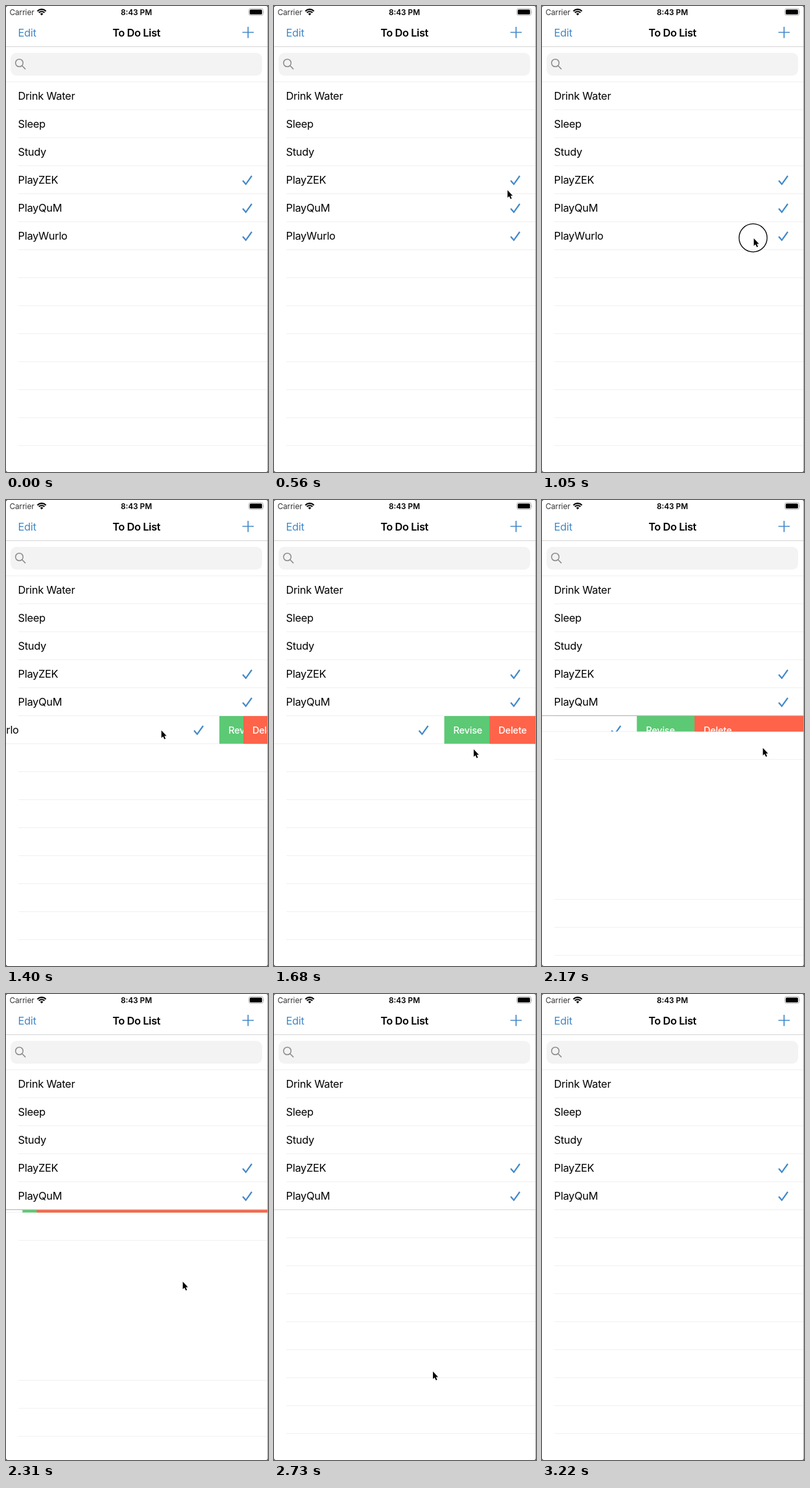
Animation of 404 by 716 pixels, one loop 3290 ms. Source, as an HTML page:

```html
<!DOCTYPE html>
<html lang="en">
<head>
<meta charset="utf-8">
<title>To Do List</title>
<style>
  html, body { margin: 0; width: 100%; height: 100%; overflow: hidden; background: #fff; }
  svg { display: block; font-family: Inter, "Liberation Sans", sans-serif; }
  #stage { width: 404px; height: 716px; }
  .body { font-size: 16.4px; letter-spacing: -.28px; }
  .title { font-size: 16.4px; font-weight: 600; letter-spacing: -.42px; text-anchor: middle; }
  .small { font-size: 11.8px; letter-spacing: -.08px; }
  .clock { font-size: 11.8px; font-weight: 600; text-anchor: middle; }
  .button { font-size: 14.6px; font-weight: 500; letter-spacing: -.25px; fill: #fff; }
  .blue { fill: #4389c8; }
  .tint { fill: none; stroke: #4389c8; }
  .line { stroke: #f0f0f0; }
</style>
</head>
<body>
<svg id="stage" viewBox="0 0 404 716">
  <rect width="404" height="716" fill="#fff"/>

  <text class="small" x="5.5" y="14" fill="#333">Carrier</text>
  <g fill="none" stroke="#000" stroke-width="2.1">
    <path d="M48.4 7.9A9.3 9.3 0 0 1 61.6 7.9"/>
    <path d="M50.7 10.2A6.1 6.1 0 0 1 59.3 10.2"/>
    <path d="M52.6 12.1A3.4 3.4 0 0 1 57.4 12.1L55 14.5Z" fill="#000" stroke="none"/>
  </g>
  <text class="clock" x="201" y="14">8:43 PM</text>
  <rect x="374.5" y="4" width="22" height="10.5" rx="2.8" fill="none" stroke="#b0b0b0"/>
  <rect x="375.8" y="5.4" width="19" height="7.7" rx="1.6"/>
  <path d="M397.5 8Q399 9.5 397.5 11Z" fill="#b0b0b0"/>

  <text class="body blue" x="18.5" y="46.5">Edit</text>
  <text class="title" x="201" y="46.5">To Do List</text>
  <path class="tint" d="M364.5 40.5H382M373.3 32V49.3" stroke-width="1.7"/>
  <path d="M0 62.5H404" stroke="#d4d4d4"/>

  <rect x="7" y="72" width="388" height="35" rx="9" fill="#f3f3f3"/>
  <g fill="none" stroke="#8b8b8f" stroke-width="1.5">
    <circle cx="20.5" cy="87.5" r="5.8"/>
    <path d="M24.8 91.8L29.6 96.6" stroke-linecap="round"/>
  </g>
  <path class="line" d="M0 116.5H404"/>

  <g id="rows"></g>
  <g id="blanks"></g>
  <path id="edge" class="line"/>

  <svg id="swipe" y="332" width="404" height="42.5" overflow="hidden">
    <g id="cell"></g>
    <rect id="green" width="404" height="43" fill="#5cc975"/>
    <text id="revise" class="button" y="26.8">Revise</text>
    <rect id="red" width="404" height="43" fill="#ff644a"/>
    <text id="delete" class="button" y="26.8">Delete</text>
  </svg>
  <path id="seam" d="M0 331.3H404" stroke="#b9a5a5"/>

  <path d="M403.5 0V716" stroke="#a8a8a8"/>
  <path d="M0 0H3Q0 0 0 3ZM404 0V3Q404 0 401 0ZM0 716V713Q0 716 3 716ZM404 716H401Q404 716 404 713Z" fill="#333"/>

  <g id="pointer">
    <circle id="touch" cx="-.5" cy=".3" r="21.6" fill="none" stroke="#000" stroke-width="1.3"/>
    <path d="M.6 1V12.6L3.2 10.2L5.2 14.6L7.1 13.7L5.2 9.4H8.6Z" stroke="#fff" stroke-width="1.4" paint-order="stroke"/>
  </g>
</svg>
<script>
const LOOP = 3290, STEP = 70, ROW = 43, TOP = 117, WIDTH = 404;
const SLOT = TOP + 5 * ROW;
const OPEN = 144, RED_WIDTH = 73;

// time, x, y of the pointer tip
const track = [
  [70, 215, 544], [140, 290, 430], [210, 337, 330], [280, 337, 330],
  [490, 350, 274], [630, 369, 290], [840, 331, 357], [1050, 326, 356],
  [1120, 314, 356], [1190, 294, 355], [1260, 271, 354], [1330, 251, 353],
  [1400, 239, 353], [1540, 262, 380], [1750, 330, 383], [1960, 359.5, 361],
  [2100, 359.5, 361], [2170, 340, 380], [2310, 272, 441], [2520, 268, 445],
  [2590, 258, 540], [2730, 244.5, 579], [3080, 208, 690], [3150, 196, 712]
];

const el = id => document.getElementById(id);
const set = (id, attrs) => {
  for (const name in attrs) el(id).setAttribute(name, attrs[name]);
};
const show = (id, on) => set(id, { visibility: on ? "visible" : "hidden" });
const ramp = (t, start, length) => Math.min(1, Math.max(0, (t - start) / length));
const easeOut = (u, power) => 1 - (1 - u) ** power;
const rule = (y, x = 19) => `<path class="line" d="M${x} ${y}H404"/>`;

function rowMarkup(label, done) {
  const tick = `<path class="tint" stroke-width="2.2" d="M365 22.3L369.8 27.8L379 15"/>`;
  return `<text class="body" x="18.5" y="27.4">${label}</text>${done ? tick : ""}`;
}

el("rows").innerHTML = ["Drink Water", "Sleep", "Study", "PlayZEK", "PlayQuM"]
  .map((label, i) => `<g transform="translate(0 ${TOP + i * ROW})">` +
    rowMarkup(label, i > 2) + rule(ROW - .5) + "</g>").join("");
el("cell").innerHTML = rowMarkup("PlayWurlo", true);
el("blanks").innerHTML = Array.from({ length: 8 }, (_, k) =>
  rule(SLOT + (k + 2) * ROW - .5)).join("");

function pointerAt(t) {
  const i = track.findIndex(key => key[0] >= t);
  if (i < 0 || t < track[0][0]) return null;
  const b = track[i], a = track[Math.max(0, i - 1)];
  const u = b === a ? 0 : (t - a[0]) / (b[0] - a[0]);
  return [a[1] + (b[1] - a[1]) * u, a[2] + (b[2] - a[2]) * u];
}

function swipeAt(t, pointer) {
  if (t < 1050) return 0;
  if (t <= 1400) return Math.max(0, 326 - pointer[0] - 12);
  return 75 + (OPEN - 75) * easeOut(ramp(t, 1400, 420), 3);
}

function draw(t) {
  const pointer = pointerAt(t);
  show("pointer", pointer);
  if (pointer) set("pointer", { transform: `translate(${pointer})` });
  const touching = t >= 980 && t < 1400 || t >= 2030 && t <= 2100;
  set("touch", { opacity: touching ? 1 : 0 });

  const gone = easeOut(ramp(t, 2090, 320), 2);
  const closing = gone > 0 && gone < 1;
  const height = ROW * (1 - gone);
  const opened = swipeAt(t, pointer);
  const shift = opened + (WIDTH - OPEN) * gone;
  const redOpen = WIDTH - opened * RED_WIDTH / OPEN;
  const redLeft = redOpen * (1 - gone ** 1.5);

  set("swipe", { height: Math.max(0, height - .5) });
  show("swipe", gone < 1);
  show("seam", closing);
  set("cell", { transform: `translate(${-shift} 0)` });
  set("green", { x: WIDTH - shift });
  set("revise", { x: WIDTH - shift + 14 });
  set("red", { x: redLeft });
  set("delete", { x: redLeft + 14 });

  const full = shift > 0 && t < 2940;
  set("edge", {
    d: `M${full ? 0 : 19} ${SLOT + height - .5}H404`,
    style: gone === 1 && full ? "stroke:#d9d9d9" : ""
  });
  set("blanks", { transform: `translate(0 ${height - ROW})` });
  // the middle rules drop out while the list closes up
  [...el("blanks").children].forEach((line, k) => {
    line.style.opacity = closing && k > 0 && k < 5 ? 0 : 1;
  });
}

const begin = performance.now();
function tick() {
  const t = (performance.now() - begin) % LOOP;
  draw(Math.floor(t / STEP) * STEP);
  requestAnimationFrame(tick);
}
tick();
</script>
</body>
</html>
```
